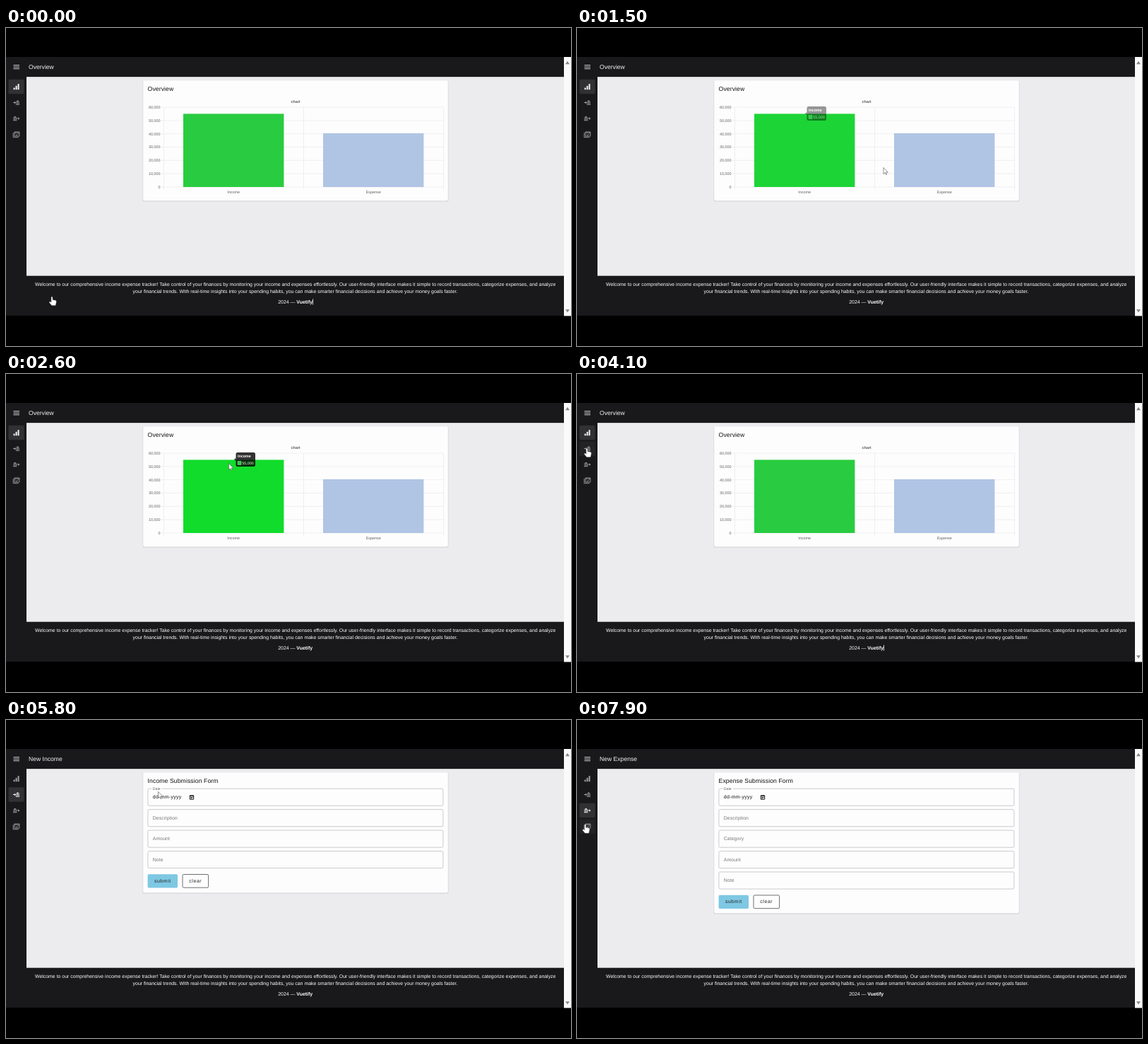
These frames come from a looping animation (800x450 px, 8000 ms). An HTML page:

```html
<!DOCTYPE html>
<html lang="en">
<head>
<meta charset="utf-8">
<title>Income expense tracker</title>
<style>
  html, body { margin: 0; width: 100%; height: 100%; overflow: hidden; background: #000; }
  svg { display: block; width: 800px; height: 450px; font-family: "Liberation Sans", Arial, sans-serif; text-rendering: geometricPrecision; }
  .body { font-size: 6.93px; fill: #fff; }
  .title { font-size: 8.6px; fill: #f4f4f4; }
  .card-title { font-size: 8.64px; letter-spacing: .1px; fill: #111; }
  .chart { font-size: 5.4px; fill: #5c5c5c; }
  .light { fill: #fff; }
  .label { font-size: 6.93px; letter-spacing: .05px; fill: #77767a; }
  .small { font-size: 5.2px; fill: #66656a; }
  .date { font-size: 6.93px; letter-spacing: .3px; fill: #111; }
  .button { font-size: 6.9px; letter-spacing: .6px; fill: #222; }
  .mid { text-anchor: middle; }
  .end { text-anchor: end; }
  .bold { font-weight: bold; }
  .line { fill: none; stroke: currentColor; stroke-width: .9; }
  .field { fill: none; stroke: #b4b3b6; stroke-width: .7; }
  .grid { stroke: #e4e4e6; stroke-width: .6; }
</style>
</head>
<body>
<svg viewBox="0 0 800 450">
  <rect y="41" width="790" height="366" fill="#19181b"/>
  <rect x="29" y="69" width="761" height="281.7" fill="#ecebed"/>
  <rect x="29" y="68.5" width="761" height="1" opacity=".25"/>
  <rect x="790" y="41" width="10" height="366.5" fill="#fafafa"/>
  <path d="M792 51.2l3 -4.4l3 4.4ZM792 398.2l3 4.4l3 -4.4Z" fill="#88888a"/>

  <path d="M10.5 52.7h8.5m-8.5 2.5h8.5m-8.5 2.5h8.5" class="line" color="#eee"/>
  <text id="heading" class="title" x="32" y="58.2"></text>
  <g id="rail"></g>

  <rect id="shadow" x="193.6" y="74.5" width="432.8" rx="2" opacity=".12"/>
  <rect id="card" x="194.2" y="74.3" width="431.6" rx="1.7" fill="#fefdfe"/>
  <text id="cardTitle" class="card-title" x="200.6" y="88.8"></text>

  <g id="overview">
    <text class="chart mid bold" x="410" y="106.3">chart</text>
    <g id="grid"></g>
    <g id="bars"></g>
    <g id="tip">
      <rect x="325.5" y="111" width="27.5" height="20" rx="2.5" opacity=".8"/>
      <path d="M325.5 118.7l-2.5 2.3l2.5 2.3Z" opacity=".8"/>
      <text class="chart light bold" x="328" y="118.4">Income</text>
      <rect x="328" y="123.5" width="5" height="5" fill="#29cc40" stroke="#ddd" stroke-width=".4"/>
      <text class="chart light" x="334.3" y="128">55,000</text>
    </g>
  </g>
  <g id="form"></g>

  <g class="body">
    <text class="mid" x="409.7" y="364.6">Welcome to our comprehensive income expense tracker! Take control of your finances by monitoring your income and expenses effortlessly. Our user-friendly interface makes it simple to record transactions, categorize expenses, and analyze</text>
    <text class="mid" x="409.5" y="374.8">your financial trends. With real-time insights into your spending habits, you can make smarter financial decisions and achieve your money goals faster.</text>
    <text x="385.2" y="389.6">2024 — <tspan class="bold">Vuetify</tspan></text>
  </g>
  <rect id="caret" x="434.2" y="383.5" width=".8" height="8" fill="#fff"/>

  <g id="cursor" fill="#fff">
    <path id="arrow" d="M0 0V9L2 7.2L3.5 10.2L4.8 9.6L3.4 6.7H6.3Z" stroke="#4a4a4c" stroke-width=".6"/>
    <path id="hand" d="M-1.1 .9Q0 -.7 1.1 .9V4.5L5 5.3Q6.6 5.8 6.4 7.4L5.3 12.8H-.3L-3.8 8.6Q-4.3 6.9 -2.6 7L-1.1 8.2Z" stroke="#222" stroke-width=".4"/>
  </g>
</svg>
<script>
const $ = id => document.getElementById(id);
const repeat = (n, make) => Array.from({ length: n }, (_, i) => make(i)).join('');
const show = (id, on) => $(id).style.display = on ? '' : 'none';
const LOOP = 8000, STEP = 100;

// Navigation rail
const navY = i => 83 + 22.5 * i;
const bank = x => `<path d="M${x} -1.3l2.7 -1.9l2.7 1.9ZM${x} 2.3h5.4v1h-5.4Z${repeat(3, i => `M${x + .5 + 1.7 * i} -.8h1v2.6h-1Z`)}"/>`;
const pointer = x => `<path d="M${x} -.4h2v-1.3l2 1.8l-2 1.8v-1.3h-2Z"/>`;
const icons = [
  repeat(3, i => `<path d="M${3 * i - 4} 4.2h2v${-2.7 - 2.7 * i}h-2Z"/>`),
  pointer(-4.6) + bank(-.8),
  bank(-4.6) + pointer(.8),
  '<path class="line" d="M-4.4 -2.2V4.2H3M-2.7 -3.5h7v6.1h-7ZM-2.7 -2.3h7M-1 .2l1.4 1.3l2.4 -2.5"/>'
];
$('rail').innerHTML = icons.map((icon, i) =>
  `<g transform="translate(14.6 ${navY(i)})"><rect x="-11.2" y="-10.3" width="22.2" height="20.6" rx="1.7"/><g fill="currentColor">${icon}</g></g>`).join('');
const navItems = [...$('rail').children];

// Chart
const BASE = 225, UNIT = 18.83;
const bars = [
  { name: 'Income', value: 5.5, color: [41, 204, 64], lit: [17, 220, 43] },
  { name: 'Expense', value: 4.04, color: [176, 196, 228], lit: [150, 181, 234] }
];
bars.forEach((bar, i) => {
  bar.x = 251 + 198 * i;
  bar.y = BASE - bar.value * UNIT;
});
$('grid').innerHTML =
  repeat(7, i => `<path class="grid" d="M219.5 ${BASE - i * UNIT}h400"/>
    <text class="chart end" x="218.6" y="${BASE + 1.9 - i * UNIT}">${i ? i * 10 + ',000' : 0}</text>`) +
  repeat(3, i => `<path class="grid" d="M${223.5 + 198 * i} 112v116.5"/>`);
$('bars').innerHTML = bars.map(b => `<rect x="${b.x}" y="${b.y}" width="142.4" height="${BASE - b.y}"/>`).join('');
$('grid').innerHTML += bars.map(b => `<text class="chart mid" x="${b.x + 71.2}" y="234.3">${b.name}</text>`).join('');

// Forms
const PITCH = 29.45;
const pages = [
  { from: 0, heading: 'Overview', title: 'Overview' },
  { from: 4600, heading: 'New Income', title: 'Income Submission Form', fields: ['Description', 'Amount', 'Note'] },
  { from: 6700, heading: 'New Expense', title: 'Expense Submission Form', fields: ['Description', 'Category', 'Amount', 'Note'] }
];
const extraRows = page => page.fields ? page.fields.length - 3 : 0;

function formMarkup(page) {
  const n = page.fields.length, y = 218.5 + extraRows(page) * PITCH;
  return repeat(n + 1, i => `<rect class="field" x="200.9" y="${97.2 + i * PITCH}" width="418" height="24.1" rx="1.7"/>`) +
    repeat(n, i => `<text class="label" x="207.8" y="${111.4 + (i + 1) * PITCH}">${page.fields[i]}</text>`) + `
    <rect x="206.5" y="95.5" width="14" height="3" fill="#fefdfe"/>
    <text class="small" x="207.8" y="98.8">Date</text>
    <text class="date" x="207.8" y="111.4">dd-mm-yyyy</text>
    <path class="line" d="M260.3 106.8h5.4v5.4h-5.4Zm0 .8h5.4m-4.2 1.9h3m-3 1.4h2"/>
    <rect x="200.6" y="${y - .2}" width="42.4" height="19.2" rx="1.7" fill="#7ec8e3"/>
    <text class="button light" x="209.9" y="${y + 11.5}">submit</text>
    <rect x="250" y="${y}" width="36.6" height="18.7" rx="1.7" fill="none" stroke="#333" stroke-width=".7"/>
    <text class="button" x="259.3" y="${y + 11.5}">clear</text>`;
}

let shown;
function showPage(page) {
  if (page === shown) return;
  shown = page;
  const height = 170.2 + extraRows(page) * 29;
  $('heading').textContent = page.heading;
  $('cardTitle').textContent = page.title;
  $('card').setAttribute('height', height);
  $('shadow').setAttribute('height', height + .8);
  show('overview', !page.fields);
  $('form').innerHTML = page.fields ? formMarkup(page) : '';
}

// Pointer stops: time, x, y
const stops = [
  [0, 65, 380], [900, 196, 85], [1200, 215.5, 158.5], [1500, 434, 197.5], [1700, 766, 205],
  [2100, 45, 57], [2600, 315.5, 126.5], [3600, 16, 54], [4100, 14, 105], [5400, 14, 105],
  [5800, 215.5, 101.5], [6000, 744, 75], [6500, 14, 125], [7100, 14, 125], [7500, 260, 165], [7900, 11.6, 147.5]
];
function pointerAt(t) {
  const i = stops.findIndex(s => s[0] >= t);
  if (i < 1) return stops[0].slice(1);
  const [t0, x0, y0] = stops[i - 1], [t1, x1, y1] = stops[i];
  const p = (t - t0) / (t1 - t0);
  return [x0 + (x1 - x0) * p, y0 + (y1 - y0) * p];
}

// A bar lights up under the pointer and fades one step after it leaves
function over(bar, t) {
  const [x, y] = pointerAt(Math.max(t, 0));
  return x > bar.x && x < bar.x + 142.4 && y > bar.y && y < BASE ? 1 : 0;
}
const glow = (bar, t) => Math.max(over(bar, t), over(bar, t - STEP) / 2);
const mix = (a, b, p) => `rgb(${a.map((v, i) => Math.round(v + (b[i] - v) * p))})`;

function draw(time) {
  const t = Math.floor(time % LOOP / STEP) * STEP;
  const page = pages.filter(p => p.from <= t).pop();
  showPage(page);

  const [x, y] = pointerAt(t);
  const onRail = x < 27, hand = onRail || t < 200;
  $('cursor').setAttribute('transform', `translate(${x} ${y})`);
  show('hand', hand);
  show('arrow', !hand);

  navItems.forEach((item, i) => {
    const active = i === pages.indexOf(page);
    const hover = onRail && Math.abs(y - navY(i)) < 10.3;
    item.style.color = active ? '#f5f5f5' : '#a09fa2';
    item.firstChild.setAttribute('fill', active ? '#313033' : hover ? '#232225' : '#19181b');
  });

  bars.forEach((bar, i) =>
    $('bars').children[i].setAttribute('fill', mix(bar.color, bar.lit, glow(bar, t))));
  $('tip').style.opacity = glow(bars[0], t);

  show('caret', (t + 200) % 1060 < 530 && t < 5700);
}

const start = performance.now();
function tick() {
  draw(performance.now() - start);
  requestAnimationFrame(tick);
}
tick();
</script>
</body>
</html>
```
